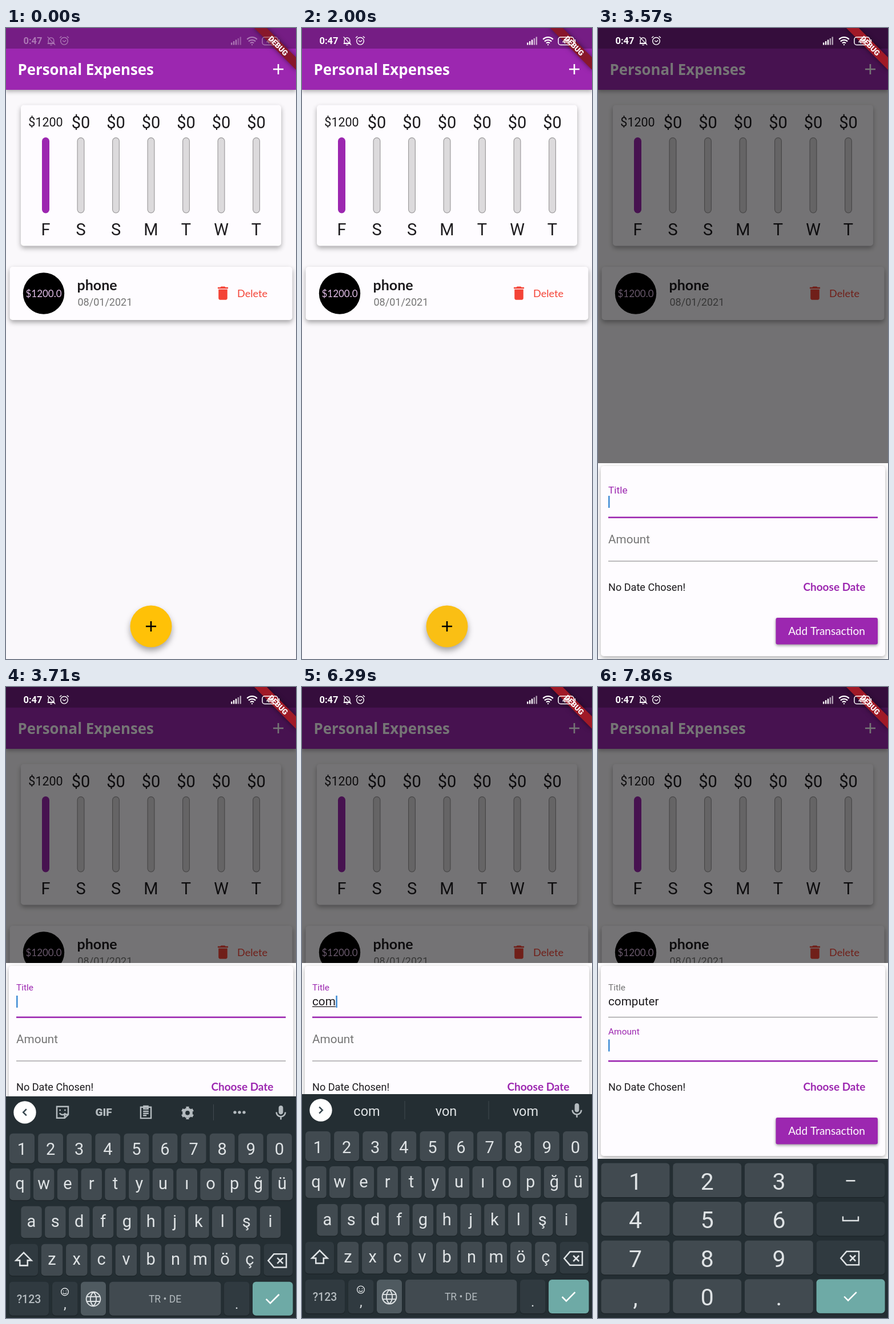
These frames come from a looping animation (508 px wide and 1102 px high, 8 s). An HTML page with a canvas:

```html
<!DOCTYPE html>
<html lang="en">
<head>
<meta charset="utf-8">
<title>Personal Expenses</title>
<style>
html, body { margin: 0; height: 100%; overflow: hidden; background: #faf8fb; }
canvas { display: block; }
</style>
</head>
<body>
<canvas id="stage" width="508" height="1102"></canvas>
<script>
const ctx = document.getElementById('stage').getContext('2d');
const LOOP = 8000, FPS = 7;
const PURPLE = '#9c27b0', INK = '#1d1b1e', GREY = '#757575', RED = '#f44336', CARD = '#fefcff';
const KEY = '#414a50', KEY_DARK = '#303a40', KEY_TEXT = '#dfe3e5', KEY_SOFT = '#b4bbbf', TEAL = '#6eaaa6';
const WORD = 'computer';
const STROKES = [5400, 5800, 6100, 6400, 6500, 6650, 6700, 6800];
const HINTS = [['c', 'co', 'ç'], ['co', 'so', 'von'], ['com', 'von', 'vom'], ['comp', 'Comp', 'komm'],
  ['compu', 'Computer', 'computer'], ['comput', 'Computer', 'computer'],
  ['compute', 'Computer', 'computer'], ['computer', 'Computer', 'computers']];
const TITLE_FOCUS = 3490, AMOUNT_FOCUS = 7400, KEYPAD = 7560;

const ICON = {
  bell: 'M6 17V11a6 6 0 0 1 12 0v6zM4 18h16M10 21h4M4 3l17 18',
  alarm: 'M4 13a8 8 0 1 0 16 0a8 8 0 1 0-16 0M8.5 12l3.5 2.5 4-3M2 6l4-3.500M22 6l-4-3.500',
  wifi: 'M2 9a14 14 0 0 1 20 0M5 13a10 10 0 0 1 14 0M8.500 16.500a5 5 0 0 1 7 0M11 19.500h2',
  trash: 'M6 19c0 1.1.9 2 2 2h8c1.1 0 2-.9 2-2V7H6v12zM19 4h-3.5l-1-1h-5l-1 1H5v2h14V4z',
  plus: 'M5 12h14M12 5v14',
  check: 'M5 12l4.5 4.5L19 7',
  shift: 'M12 4L3 13h4.500v6h9v-6H21z',
  back: 'M8 5h13v14H8L2 12zM11.500 9l6 6m0-6l-6 6',
  globe: 'M3 12a9 9 0 1 0 18 0a9 9 0 1 0-18 0M3.800 9h16.400M3.800 15h16.400M12 3c-5 5-5 13 0 18c5-5 5-13 0-18',
  smile: 'M3 12a9 9 0 1 0 18 0a9 9 0 1 0-18 0M8.500 8.500v2M15.500 8.500v2M7.500 14c2 3.500 7 3.500 9 0',
  mic: 'M12 14c1.7 0 3-1.3 3-3V5c0-1.7-1.3-3-3-3S9 3.3 9 5v6c0 1.700 1.300 3 3 3zM17 11c0 2.800-2.200 5-5 5s-5-2.200-5-5H5c0 3.500 2.600 6.400 6 6.900V21h2v-3.100c3.400-.5 6-3.400 6-6.900z',
  gear: 'M6.500 12a5.500 5.500 0 1 0 11 0a5.500 5.500 0 1 0-11 0M12 2.500v3M12 18.500v3M3.800 7.200l2.600 1.500M17.600 15.300l2.600 1.500M3.800 16.800l2.600-1.500M17.600 8.700l2.600-1.500',
  clip: 'M4.500 4.500h15v16h-15zM9 3h6v4H9zM8 10.500h8M8 13.500h8M8 16.500h5',
  sticker: 'M4 4h16v11l-5 5H4zM8.500 8v2M15.500 8v2M8 13c2 3 6 3 8 0M20 15h-5v5',
  space: 'M3 9v5h18V9',
  left: 'M14.500 7l-5 5 5 5',
  right: 'M9.500 7l5 5-5 5'
};

const ramp = (t, from, to) => Math.min(1, Math.max(0, (t - from) / (to - from)));
const easeOut = p => 1 - (1 - p) ** 2;
const mix = (a, b, p) => a + (b - a) * p;

function text(str, x, y, size, color, align = 'left', family = 'Roboto', weight = 400) {
  ctx.font = `${weight} ${size}px "${family}", sans-serif`;
  ctx.textAlign = align;
  ctx.fillStyle = color;
  ctx.fillText(str, x, y);
}

function rect(x, y, w, h, color) {
  ctx.fillStyle = color;
  ctx.fillRect(x, y, w, h);
}

function round(x, y, w, h, r, color) {
  ctx.beginPath();
  ctx.roundRect(x, y, w, h, r);
  ctx.fillStyle = color;
  ctx.fill();
}

function disc(x, y, r, color) {
  round(x - r, y - r, 2 * r, 2 * r, r, color);
}

function shadowed(blur, dy, alpha, draw) {
  ctx.save();
  ctx.shadowColor = `rgba(0,0,0,${alpha})`;
  ctx.shadowBlur = blur;
  ctx.shadowOffsetY = dy;
  draw();
  ctx.restore();
}

// Icons live on a 24-unit grid centred on (x, y); line 0 means filled.
function icon(name, x, y, size, color, line = 0) {
  const path = new Path2D(ICON[name]);
  ctx.save();
  ctx.translate(x, y);
  ctx.scale(size / 24, size / 24);
  ctx.translate(-12, -12);
  ctx.fillStyle = ctx.strokeStyle = color;
  ctx.lineWidth = line;
  if (line) ctx.stroke(path); else ctx.fill(path);
  ctx.restore();
}

function drawChart() {
  shadowed(9, 4, .32, () => round(26, 134.5, 456, 246, 5, CARD));
  [...'FSSMTWT'].forEach((day, i) => {
    const x = 69.5 + 61.5 * i;
    if (i) text('$0', x, 174.5, 29, INK, 'center');
    else text('$1200', x, 171.5, 21.5, INK, 'center');
    round(x - 6.5, 191, 13, 132.5, 6.5, i ? '#9e9c9e' : PURPLE);
    if (i) round(x - 5.3, 192.2, 10.6, 130.1, 5.3, '#dcdadc');
    text(day, x, 361.5, 29, INK, 'center');
  });
}

function drawPage(t) {
  rect(0, 0, 508, 1102, '#faf8fb');
  shadowed(7, 3, .3, () => rect(0, 0, 508, 108, PURPLE));
  rect(0, 0, 508, 36, 'rgba(0,0,0,.25)');
  text('Personal Expenses', 20.5, 81.5, 25.87, '#fff', 'left', 'Open Sans', 700);
  icon('plus', 477, 72, 31, '#fff', 2);
  drawChart();
  shadowed(8, 4, .35, () => round(6.5, 417, 495, 93, 5, CARD));
  disc(66, 463.5, 36.2, '#000');
  text('$1200.0', 66, 469.5, 17, '#e1bee7', 'center', 'Lato');
  text('phone', 124.5, 458, 25, INK, 'left', 'Lato', 700);
  text('08/01/2021', 125.5, 484.5, 18, GREY);
  icon('trash', 380, 463, 31, RED);
  text('Delete', 405, 470, 18.1, RED, 'left', 'Lato');
  shadowed(11, 6, .35, () => disc(254, 1045, 36.5, t < 1990 ? '#ffc107' : '#fabf14'));
  icon('plus', 254, 1045, 31, '#000', 2);
}

function drawField(label, top, value, floated, focused, cursorOn, composing) {
  const base = mix(top + 63.5, top + 48, floated);
  text(label, 18, base, mix(20.7, 15.5, floated), focused ? PURPLE : GREY);
  if (focused) rect(18, top + 93.5, 472, 2.6, PURPLE);
  else rect(18, top + 94, 472, 1.2, '#929092');
  text(value, 18, top + 74, 20.7, INK);
  const end = 18 + ctx.measureText(value).width;
  if (composing && value) rect(18, top + 75.7, end - 18, 1.3, INK);
  if (cursorOn) rect(value ? end + .5 : end, top + 57, 2.6, 21, '#448fd6');
}

function drawSheet(t, typed) {
  const enter = ramp(t, 2000, 2241);
  if (!enter) return;
  rect(0, 0, 508, 1102, `rgba(0,0,0,${.54 * Math.min(1, enter * 1.7)})`);
  const top = 760 + 342 * (1 - easeOut(enter)) - 278 * easeOut(ramp(t, 3590, 3710));
  const onTitle = t > TITLE_FOCUS && t < AMOUNT_FOCUS, onAmount = t >= AMOUNT_FOCUS;
  const lastInput = onAmount ? AMOUNT_FOCUS : typed ? STROKES[typed - 1] : TITLE_FOCUS;
  const blink = (t - lastInput) % 1000 < 500;
  const floatFrom = start => easeOut(ramp(t, start, start + 200));

  rect(0, top, 508, 1102 - top, '#fffeff');
  shadowed(8, 3, .32, () => round(5, top + 5, 498, 332, 5, CARD));
  drawField('Title', top, WORD.slice(0, typed), floatFrom(TITLE_FOCUS), onTitle, onTitle && blink, onTitle);
  drawField('Amount', top + 76.5, '', floatFrom(AMOUNT_FOCUS), onAmount, onAmount && blink);
  text('No Date Chosen!', 18, top + 223, 18.1, INK);
  text('Choose Date', 468.5, top + 223, 19, PURPLE, 'right', 'Lato', 700);
  shadowed(5, 2, .4, () => round(311.5, top + 270, 178.5, 46.5, 3, PURPLE));
  text('Add Transaction', 400.5, top + 299.5, 19, '#fff', 'center', 'Lato');
}

function drawKey(x, y, w, h, color, label, base, size = 29) {
  shadowed(1, 1, .3, () => round(x, y, w, h, 6, color));
  if (label) text(label, x + w / 2, y + base, size, KEY_TEXT, 'center');
}

function keyRow(letters, first, pitch, width, y, h, base) {
  [...letters].forEach((c, i) => drawKey(first + pitch * i - width / 2, y, width, h, KEY, c, base));
}

function drawToolbar(top, typed) {
  const y = top + 28;
  disc(33, y, 19.7, '#fff');
  icon(typed ? 'right' : 'left', 33, y, 27, '#37474f', 2.2);
  icon('mic', 481.5, y + 1, 31, KEY_SOFT);
  if (typed) {
    HINTS[typed - 1].forEach((word, i) => text(word, [113.5, 252.5, 391.5][i], top + 37.5, 23.5, KEY_TEXT, 'center'));
    for (const x of [179.5, 326.5]) rect(x, y - 16, 1, 32, '#414a50');
    return;
  }
  icon('sticker', 99, y, 30, KEY_SOFT, 2);
  text('GIF', 171, y + 6.5, 19, KEY_SOFT, 'center', 'Roboto', 900);
  icon('clip', 245, y, 29, KEY_SOFT, 2);
  icon('gear', 318, y + 1, 28, KEY_SOFT, 4.4);
  rect(363, y - 14, 1, 28, '#414a50');
  for (const x of [401, 409, 417]) disc(x, y, 2.7, KEY_SOFT);
}

function drawLetters(top, typed) {
  rect(0, top, 508, 400, '#242e33');
  drawToolbar(top, typed);
  keyRow('1234567890', 28, 50.1, 44, top + 65, 52, 37.5);
  keyRow('qwertyuıopğü', 24.5, 41.75, 36.5, top + 126, 55.5, 36.5);
  keyRow('asdfghjklşi', 44.5, 41.85, 36.5, top + 192, 55.5, 36.5);
  const row = top + 258, foot = top + 324;
  drawKey(5.5, row, 50.5, 55.5, KEY_DARK);
  icon('shift', 31, row + 27, 36, KEY_TEXT, 1.7);
  keyRow('zxcvbnmöç', 80.5, 43.3, 37.5, row, 55.5, 36);
  drawKey(451.5, row, 50.5, 55.5, KEY_DARK);
  icon('back', 476, row + 29, 40, KEY_TEXT, 1.5);

  drawKey(5.5, foot, 69.5, 59, KEY_DARK);
  text('?123', 40, foot + 37, 19.5, KEY_SOFT, 'center', 'Roboto', 500);
  drawKey(81, foot, 44.500, 59, KEY_DARK, ',', 47, 24);
  icon('smile', 103, foot + 17.5, 17, KEY_TEXT, 2);
  drawKey(131, foot, 44, 59, '#4f5a60');
  icon('globe', 153, foot + 30, 33, KEY_TEXT, 1.4);
  drawKey(181, foot, 195.5, 59, KEY);
  text('TR • DE', 278.5, foot + 36, 17.5, KEY_SOFT, 'center');
  drawKey(382, foot, 44.5, 59, KEY_DARK, '.', 47, 24);
  drawKey(432, foot, 70.5, 59, TEAL);
  icon('check', 467, foot + 30, 39, '#fff', 1.6);
}

function drawKeypad() {
  rect(0, 824, 508, 278, '#242e33');
  ['123', '456', '789', ',0.'].forEach((labels, r) => {
    const y = 831.5 + 67.6 * r;
    [...labels].forEach((c, i) => drawKey(5.5 + 125.7 * i, y, 120, 59.5, KEY, c, 46, 41));
    drawKey(382.6, y, 120, 59.5, r === 3 ? TEAL : KEY_DARK);
  });
  rect(434.5, 861, 16, 2.6, KEY_TEXT);
  icon('space', 442.500, 929, 36, KEY_TEXT, 1.6);
  icon('back', 442, 997.5, 40, KEY_TEXT, 1.5);
  icon('check', 442, 1064.5, 37, '#fff', 1.6);
}

function drawKeyboard(t, typed) {
  if (t >= KEYPAD) return drawKeypad();
  const up = easeOut(ramp(t, 3590, 3728));
  if (up) drawLetters(711 + 391 * (1 - up), typed);
}

function drawRibbon(t) {
  ctx.save();
  ctx.translate(508, 0);
  ctx.rotate(Math.PI / 4);
  shadowed(8, 0, .5, () => rect(-51.7, 36.2, 103.4, 15.5, t < 2100 ? '#88172b' : '#a01a27'));
  text('DEBUG', 0, 48.7, 13.2, '#fff', 'center', 'Roboto', 900);
  ctx.restore();
}

function drawStatus(t) {
  const white = '#fff';
  ctx.save();
  ctx.globalAlpha = mix(.4, 1, ramp(t, 290, 714));
  text('0:47', 30.5, 28.3, 16.5, white, 'left', 'Roboto', 700);
  icon('bell', 79, 22.5, 19, white, 1.8);
  icon('alarm', 102, 22, 19, white, 1.8);
  for (let i = 0; i < 5; i++) {
    const h = 4 + 2.5 * i;
    rect(394 + 3.9 * i, 29.5 - h, 2.4, h, i < 3 ? white : 'rgba(255,255,255,.6)');
  }
  icon('wifi', 431, 22.5, 21, white, 2.6);
  ctx.beginPath();
  ctx.roundRect(449, 16, 27, 13.5, 4);
  ctx.lineWidth = 1.5;
  ctx.strokeStyle = white;
  ctx.stroke();
  rect(477.5, 20, 1.6, 5.5, white);
  text('48', 462.5, 27, 11.5, white, 'center', 'Roboto', 700);
  ctx.restore();
}

function render(now) {
  const step = Math.min(LOOP * FPS / 1000 - 1, Math.floor((now % LOOP + 5) * FPS / 1000));
  const t = step * 1000 / FPS;
  const typed = STROKES.filter(at => t >= at).length;
  drawPage(t);
  drawSheet(t, typed);
  drawKeyboard(t, typed);
  drawRibbon(t);
  drawStatus(t);
}

const start = performance.now();
function tick() {
  render(performance.now() - start);
  requestAnimationFrame(tick);
}
tick();
</script>
</body>
</html>
```
